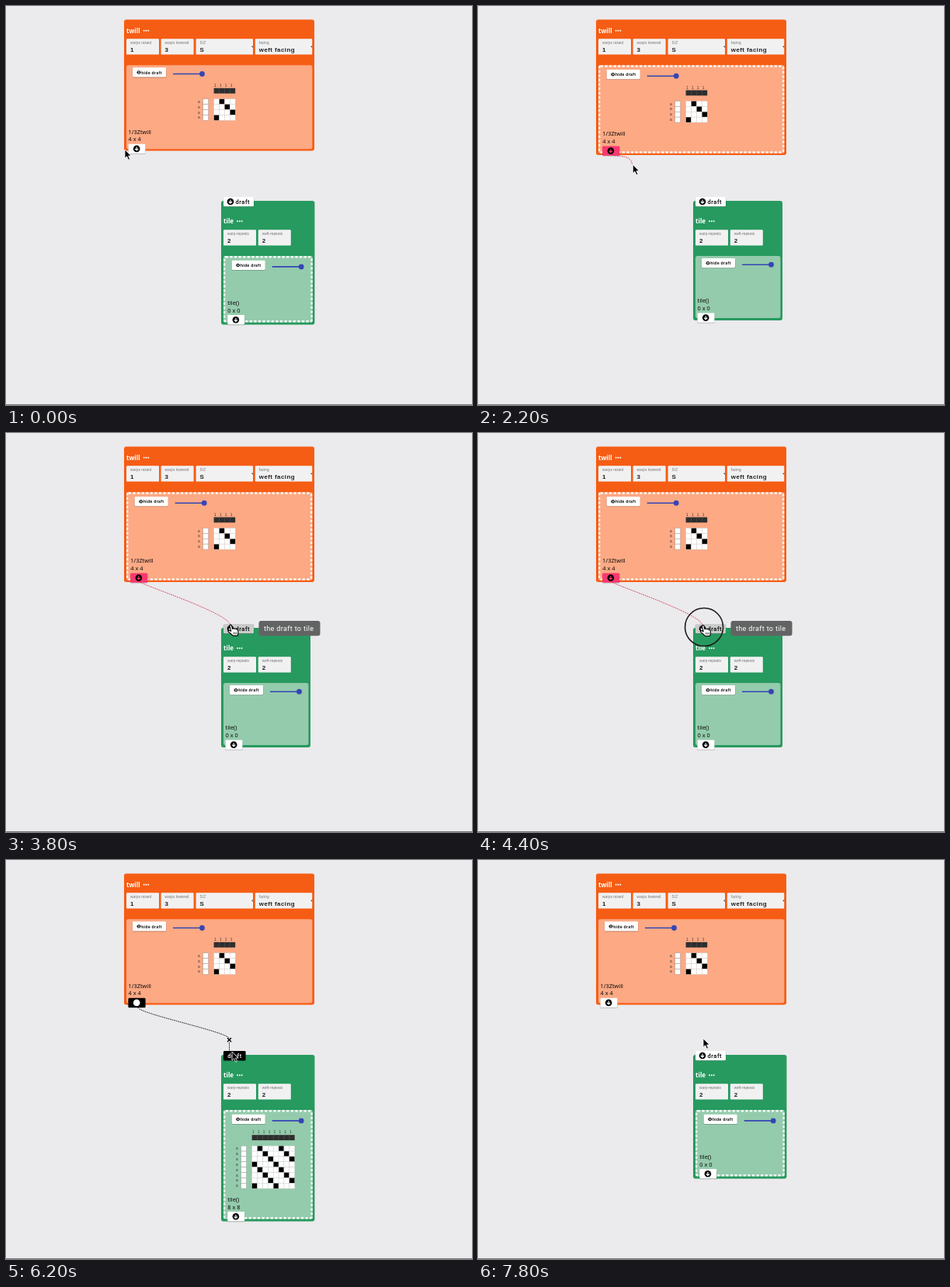
An HTML page for the animation above (8 s loop, 600 by 514 pixels).

```html
<!DOCTYPE html>
<html lang="en">
<head>
<meta charset="utf-8">
<title>Linking a draft to an operation</title>
<style>
  html, body { margin: 0; width: 100%; height: 100%; overflow: hidden; background: #ebeaec; }
  svg { display: block; width: 600px; height: 514px; }
  text { white-space: pre; }
  .title { font: bold 8px "Open Sans", sans-serif; fill: #fff; }
  .info { font: 7.4px "Open Sans", sans-serif; }
  .label { font: 4.8px "Liberation Sans", sans-serif; fill: #777; }
  .value { font: bold 8px "Liberation Sans", sans-serif; fill: #222; letter-spacing: .4px; }
  .hide { font: 500 5.5px Roboto, sans-serif; letter-spacing: .3px; }
  .inlet { font: 500 7.5px Roboto, sans-serif; letter-spacing: .5px; }
  .tiny { font: 4.8px "Liberation Sans", sans-serif; fill: #333; }
  .tip { font: 9px Roboto, sans-serif; fill: #fff; letter-spacing: .36px; }
</style>
</head>
<body>
<svg id="stage" viewBox="0 0 600 514"></svg>
<script>
const LOOP = 8000, STEP = 200, CELL = 6.87, PAD = 2.7;
const GRAB = 1000, HOVER = 3600, PRESS = 4200, LINK = 4600, OVER_X = 6600, PRESS_X = 7200, UNLINK = 7400;

// Pointer path: time, x, y
const path = [
  [0, 153, 185], [200, 153, 185], [800, 165, 186], [1800, 165, 186],
  [3000, 268, 241], [3600, 289, 247], [5000, 290, 248], [5600, 291, 248],
  [6200, 291, 247], [6800, 289, 230], [7400, 289, 230], [7800, 290, 230], [8000, 290, 230]
];

const rect = (x, y, w, h, fill, r = 0, extra = '') =>
  `<rect x="${x}" y="${y}" width="${w}" height="${h}" rx="${r}" fill="${fill}" ${extra}/>`;
const circle = (x, y, r, fill, extra = '') =>
  `<circle cx="${x}" cy="${y}" r="${r}" fill="${fill}" ${extra}/>`;
const line = (d, color, width, extra = '') =>
  `<path d="${d}" fill="none" stroke="${color}" stroke-width="${width}" ${extra}/>`;
const label = (cls, x, y, str, extra = '') =>
  `<text class="${cls}" x="${x}" y="${y}" ${extra}>${str}</text>`;
const repeat = (n, fn) => Array.from({ length: n }, (_, i) => fn(i)).join('');

function button(x, y, w, fill = '#fff') {
  return rect(x - .3, y + .8, w + .6, 12.3, 'rgba(0,0,0,.25)', 1.5) + rect(x, y, w, 12.3, fill, 1.2);
}

function downIcon(x, y, fill, arrow) {
  return circle(x, y, 4.3, fill) +
    line(`M${x} ${y - 2.4}V${y + 1.8}M${x - 2.1} ${y}l2.1 2.1l2.1 -2.1`, arrow, 1.2);
}

function header(x, y, name, dots) {
  return label('title', x, y, name) + repeat(3, i => circle(dots + i * 2.8, y - 3, 1, '#fff'));
}

function param(x, y, w, name, value, menu) {
  return rect(x, y, w, 20.3, '#f1f1f2', 1.2) +
    label('label', x + 5, y + 7, name) + label('value', x + 5, y + 16.4, value) +
    (menu ? `<path d="M${x + w - 2} ${y + 9.5}h2.5l-1.2 1.6z" fill="#333"/>` : '');
}

function weave(center, y, n) {
  const left = center - n * CELL / 2 + 6.8, size = n * CELL, top = y + 14;
  const cells = repeat(n * n, i => {
    const row = Math.floor(i / n), col = i % n;
    const black = col % 4 === (row + 1) % 4;
    return rect(left + col * CELL, top + row * CELL, CELL, CELL, black ? '#000' : '#fff', 0,
      'stroke="#ccc" stroke-width=".4"');
  });
  return rect(left, y, size, CELL, '#2e2e2e') + cells + repeat(n, i =>
    line(`M${left + i * CELL} ${y}v${CELL}`, '#666', .4) +
    label('tiny', left + i * CELL + .4, y - 1.8, '1') +
    rect(left - 14, top + i * CELL, CELL, CELL, '#fff', 0, 'stroke="#999" stroke-width=".5"') +
    label('tiny', left - 20.7, top + i * CELL + 5, 'a'));
}

function draftBox({ x, y, w, h, fill, name, count, selected, outlet, ink }) {
  const pad = selected ? PAD : 0, left = x + pad, top = y + pad, bottom = y + h - pad;
  const arrow = outlet === '#000' ? '#fff' : outlet;
  return rect(x, y, w, h, fill, 2.5) +
    (selected ? rect(x + 1.2, y + 1.2, w - 2.4, h - 2.4, 'none', 1.5,
      'stroke="#fff" stroke-width="2.4" stroke-dasharray="3.3 2.3" stroke-opacity=".9"') : '') +
    button(left + 8, top + 3, 43) +
    `<path d="M${left + 13.2} ${top + 9.2}q2.8 -4.4 5.6 0q-2.8 4.4 -5.6 0z"/>` +
    circle(left + 16, top + 9.2, 1.25, '#fff') + circle(left + 16, top + 9.2, .65, '#000') +
    label('hide', left + 19.2, top + 11.2, 'hide draft') +
    line(`M${left + 60} ${top + 11.2}h37.5`, '#3545b5', 1.6) +
    circle(left + 97.5, top + 11.2, 3.4, '#3545b5') +
    (count ? weave(x + w / 2, top + 29.5, count) : '') +
    label('info', left + 2.6, bottom - 19.8, name) +
    label('info', left + 2.6, bottom - 10, `${count} x ${count}`) +
    button(left + 2.5, bottom - 6.6, 22, outlet) +
    downIcon(left + 13.2, bottom - .4, ink, arrow);
}

function twill(selected, outlet, ink) {
  const h = selected ? 113.4 : 108;
  return rect(152, 17.5, 245, h + 61, '#f65d14', 3) +
    header(155, 34.8, 'twill', 177.7) +
    param(155, 42.3, 42, 'warps raised', '1') + param(199.6, 42.3, 42, 'warps lowered', '3') +
    param(244.6, 42.3, 73.4, 'S/Z', 'S', true) + param(320.8, 42.3, 73.4, 'facing', 'weft facing', true) +
    draftBox({ x: 155, y: 76.3, w: 239.3, h, fill: '#fca984', name: '1/3Ztwill', count: 4, selected, outlet, ink });
}

function tile(selected, linked, hover) {
  const grow = selected ? PAD * 2 : 0, h = 80 + grow + (linked ? 55 : 0);
  const inlet = linked
    ? button(280, 246, 28.5, '#000') + label('inlet', 285.2, 254.6, 'draft', 'fill="#fff"')
    : button(280, 246, 39, hover ? '#c9cbca' : '#fff') + downIcon(289, 252, '#000', '#fff') +
      label('inlet', 295.6, 254.6, 'draft');
  return rect(277, 251, 115 + grow, h + 74, '#279a5f', 3) + inlet +
    header(280, 280.2, 'tile', 298) +
    param(280, 288.3, 42, 'warp-repeats', '2') + param(324.8, 288.3, 42, 'weft-repeats', '2') +
    draftBox({ x: 280, y: 322, w: 109.4 + grow, h, fill: '#94cbac', name: 'tile()',
      count: linked ? 8 : 0, selected, outlet: '#fff', ink: '#000' });
}

function pointer(x, y, hand) {
  const d = hand
    ? 'M-1.2 1Q0 -1 1.3 1L2.4 5.2Q4 3.8 5.2 5.2Q6.6 4.4 7.6 5.8Q9.3 5.4 9.6 7.4L9.9 10.6L9 14H3.1Q.8 11.6 -3 8.8Q-3.6 6.8 -1.4 7.3L.6 8.2Z'
    : 'M0 0V11.2L2.6 8.8L4.6 13.2L6.5 12.3L4.6 8.1H8.1Z';
  const paint = hand ? 'fill="#fff" stroke="#000" stroke-width="1.1"' : 'fill="#000" stroke="#fff" stroke-width=".8"';
  return `<g transform="translate(${x} ${y})"><path d="${d}" ${paint} stroke-linejoin="round"/>` +
    (hand ? line('M4 9.5v2.6M5.8 9.5v2.6M7.6 9.5v2.6', '#000', .7) : '') + '</g>';
}

function pointerAt(t) {
  const i = path.findIndex(p => p[0] > t);
  const [t0, x0, y0] = path[i - 1], [t1, x1, y1] = path[i];
  const k = (t - t0) / (t1 - t0);
  return [x0 + (x1 - x0) * k, y0 + (y1 - y0) * k];
}

function render(t) {
  const [x, y] = pointerAt(t);
  const dragging = t >= GRAB && t < LINK, linked = t >= LINK && t < UNLINK;
  const hover = t >= HOVER && t < LINK;
  const hand = (t >= 800 && t < 1800) || hover || (t >= OVER_X && t < UNLINK);
  const outlet = dragging ? '#fa386f' : linked ? '#000' : '#fff';
  const ink = linked ? '#fff' : '#000';
  let out = rect(0, 513, 600, 1, '#777') + twill(dragging, outlet, ink) + tile(!dragging, linked, hover);

  if (dragging && t >= 1800) {
    out += line(`M171 191C172 195 ${x - 1} ${y - 15} ${x - 1} ${y}`, '#e8304f', .9, 'stroke-dasharray="1.8 1"');
  }
  if (linked) {
    out += line('M170 190C171 198 287.5 222 287.5 230M287.5 235V246', '#000', .9, 'stroke-dasharray="1.6 1"') +
      line('M285 229.3l5 5m0 -5l-5 5', '#000', 1.4);
  }
  if (hover) {
    out += rect(325.5, 242, 79, 19.3, '#626463', 3) + label('tip', 332, 255, 'the draft to tile');
  }
  if ((t >= PRESS && t < LINK) || (t >= PRESS_X && t < UNLINK)) {
    out += circle(x + 1.5, y + 2.5, 24.5, 'none', 'stroke="#1c1c1c" stroke-width="1.6"');
  }
  return out + pointer(x, y, hand);
}

const stage = document.getElementById('stage');
const start = performance.now();
let shown = -1;
function tick() {
  const elapsed = (performance.now() - start) % LOOP;
  const t = Math.floor(elapsed / STEP) * STEP;
  if (t !== shown) stage.innerHTML = render(shown = t);
  requestAnimationFrame(tick);
}
tick();
</script>
</body>
</html>
```
